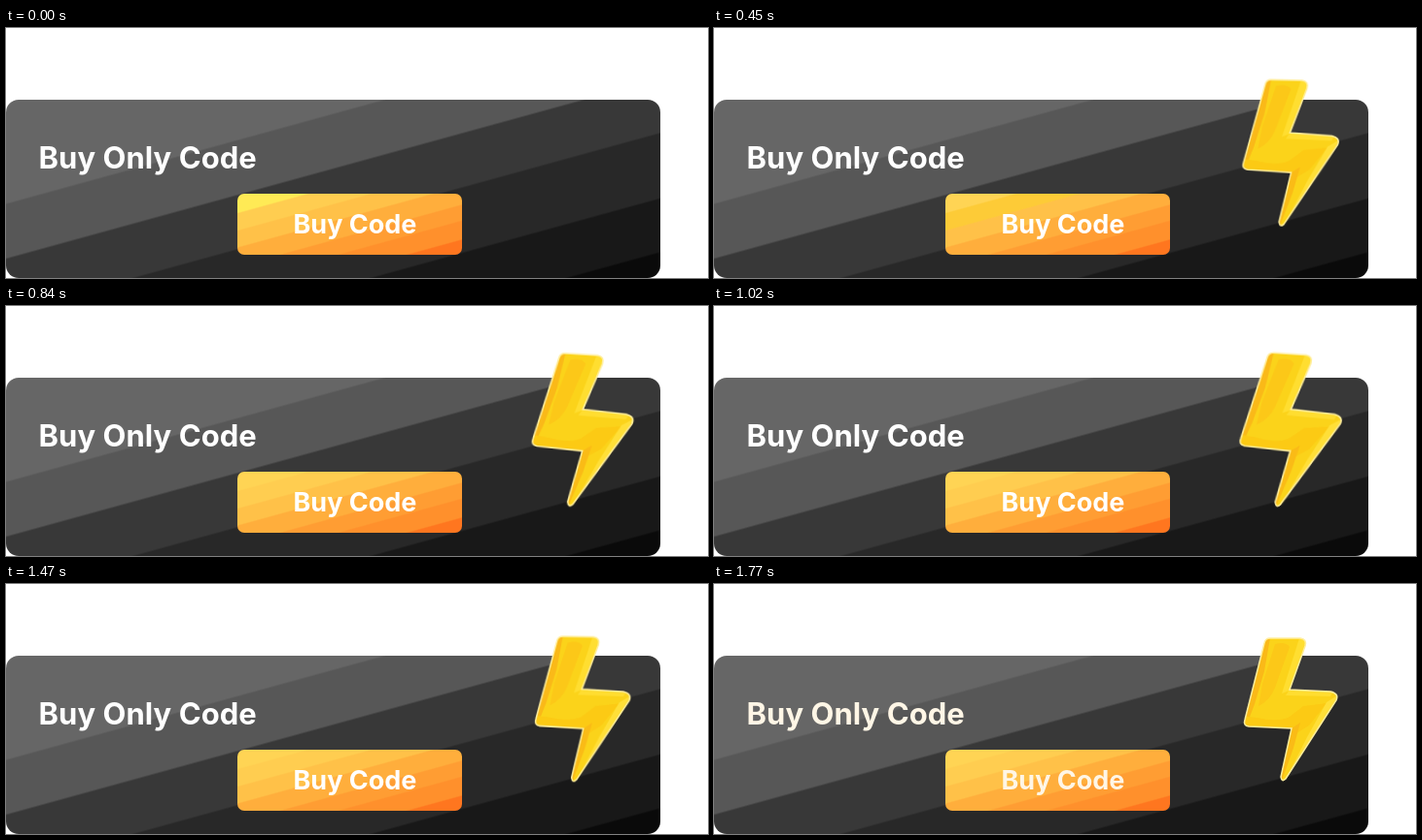
Animation of 722 by 258 pixels, one loop 1.8 s. Source, as an HTML page without scripts:

```html
<!DOCTYPE html>
<html lang="en">
<head>
<meta charset="utf-8">
<title>Buy Only Code</title>
<style>
  html, body { margin: 0; width: 100%; height: 100%; overflow: hidden; background: #fff; }
  svg { display: block; width: 722px; height: 258px; }
  text { font-family: Inter, "Open Sans", sans-serif; font-weight: 700; fill: #fff; animation: tint 1.8s step-end infinite; }
  .title { font-size: 31px; letter-spacing: .05px; }
  .label { font-size: 27px; }
  .corner { animation: corner 1.8s step-end infinite; }
  .warm { animation: warm 1.8s step-end infinite; }
  .bolt { animation: show 1.8s step-end infinite; }
  .pulse { transform-origin: 593px 129px; animation: pulse 1.8s infinite; }

  @keyframes pulse {
    0% { transform: none; animation-timing-function: ease-in; }
    53% { transform: translateY(-1px) rotate(4.4deg) scale(1.085); animation-timing-function: ease-out; }
    100% { transform: none; }
  }
  @keyframes show {
    0% { visibility: hidden; }
    1.66%, 100% { visibility: visible; }
  }
  @keyframes tint {
    0% { fill: #fff; }
    1.66% { fill: #fff6e6; }
    18.33% { fill: #fff; }
    91.66%, 100% { fill: #fff6e6; }
  }
  @keyframes corner {
    0% { stop-color: #ffea55; }
    1.66%, 100% { stop-color: #ffd454; }
  }
  @keyframes warm {
    0% { stop-color: #ffcd50; }
    23.33% { stop-color: #fdcb37; }
    46.66% { stop-color: #ffcd50; }
    63.33% { stop-color: #fdcb37; }
    78.33%, 100% { stop-color: #ffcd50; }
  }
</style>
</head>
<body>
<svg viewBox="0 0 722 258">
  <defs>
    <linearGradient id="dark" gradientUnits="userSpaceOnUse" x1="0" y1="0" x2="128.2" y2="464.6">
      <stop offset=".361" stop-color="#666"/><stop offset=".365" stop-color="#575757"/>
      <stop offset=".474" stop-color="#575757"/><stop offset=".478" stop-color="#383838"/>
      <stop offset=".586" stop-color="#383838"/><stop offset=".59" stop-color="#282828"/>
      <stop offset=".721" stop-color="#282828"/><stop offset=".725" stop-color="#181818"/>
      <stop offset=".832" stop-color="#181818"/><stop offset=".836" stop-color="#0a0a0a"/>
    </linearGradient>
    <linearGradient id="gold" gradientUnits="userSpaceOnUse" x1="0" y1="0" x2="128.2" y2="464.6">
      <stop class="corner" offset=".512"/><stop class="warm" offset=".515"/>
      <stop class="warm" offset=".548"/><stop offset=".551" stop-color="#ffc148"/>
      <stop offset=".583" stop-color="#ffc148"/><stop offset=".586" stop-color="#ffae3c"/>
      <stop offset=".622" stop-color="#ffae3c"/><stop offset=".625" stop-color="#ff9d33"/>
      <stop offset=".655" stop-color="#ff9d33"/><stop offset=".658" stop-color="#ff902c"/>
      <stop offset=".694" stop-color="#ff902c"/><stop offset=".697" stop-color="#ff761f"/>
    </linearGradient>
    <path id="shape" d="M566 61Q567 56 572 56L603 56Q610 57 608 64L592 109L634 111Q643 113 640 120L588 201Q584 205 583 199L594 149L550 147Q544 146 546 140Z"/>
    <clipPath id="edge"><use href="#shape"/></clipPath>
  </defs>

  <rect y="74" width="673" height="184" rx="13" fill="url(#dark)"/>
  <text class="title" x="33.5" y="145.3">Buy Only Code</text>
  <rect x="238" y="171" width="231" height="63" rx="7" fill="url(#gold)"/>
  <text class="label" x="295.5" y="212">Buy Code</text>

  <g class="bolt">
    <g class="pulse">
      <g clip-path="url(#edge)">
        <use href="#shape" fill="#fbd31a"/>
        <path d="M560 50H573L566 90L556 124L546 150H540Z" fill="#fab918"/>
        <path d="M577 62Q588 59 592 65L577 107Q572 120 560 126L564 103Z" fill="#fcc818"/>
        <path d="M540 136L559 138Q580 143 592 137L606 126L630 123L612 146L596 156L594 150H540Z" fill="#fcca14"/>
        <path d="M594 149L603 143L596 169L583 206L578 200Z" fill="#fabb16"/>
        <path d="M602 56H612L594 109L584 113Z" fill="#ffde30"/>
        <path d="M592 109L637 110L634 116L588 115Z" fill="#ffdd30"/>
        <path d="M643 114L586 206L610 158L630 122Z" fill="#ffdf38"/>
      </g>
      <use href="#shape" fill="none" stroke="#ffee9c" stroke-width="1.5"/>
    </g>
  </g>
</svg>
</body>
</html>
```
